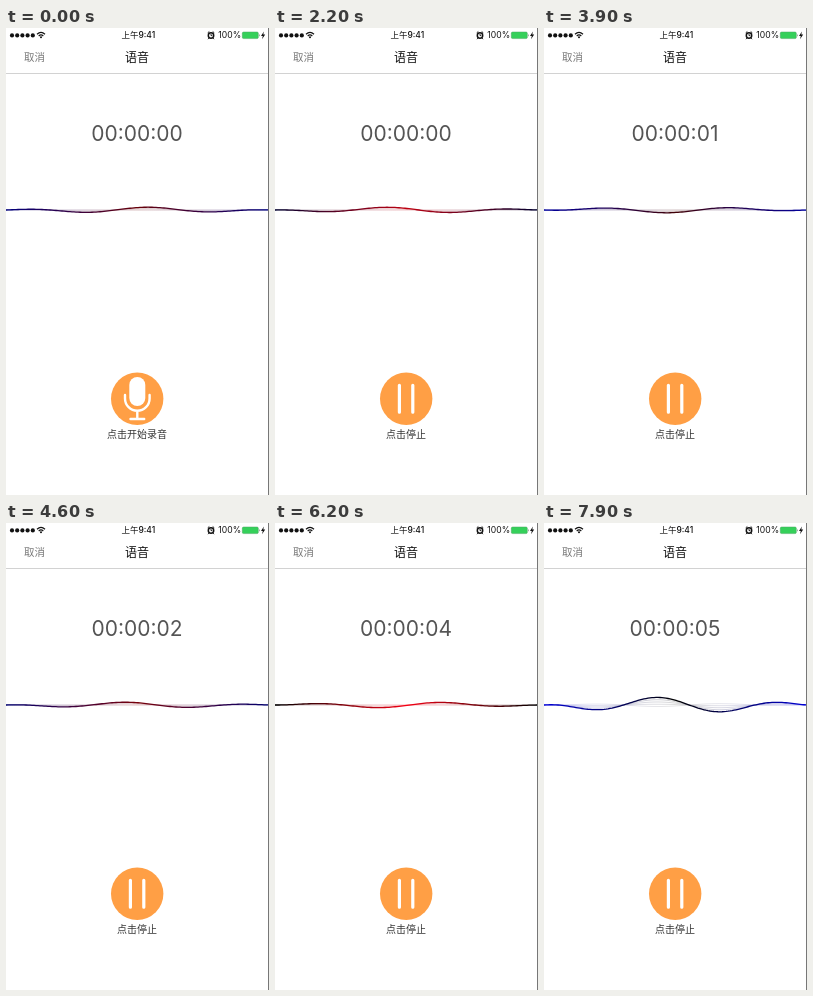
These frames come from a looping animation (263x467 px, 8000 ms). An HTML page:

```html
<!DOCTYPE html>
<html lang="zh">
<head>
<meta charset="utf-8">
<style>
  html, body { margin: 0; width: 100%; height: 100%; overflow: hidden; background: #fff; }
  svg { display: block; width: 100%; height: 100%; }
  text { font-family: Inter, "Noto Sans CJK SC", "Noto Sans CJK", sans-serif; }
  .mid { text-anchor: middle; }
  .line { fill: none; stroke: #fff; stroke-linecap: round; }
</style>
</head>
<body>
<svg viewBox="0 0 263 467">
  <defs>
    <linearGradient id="tint" gradientUnits="userSpaceOnUse" x1="0" y1="0" x2="263" y2="0">
      <stop class="edge" offset="0"/>
      <stop class="core" offset=".5"/>
      <stop class="edge" offset="1"/>
    </linearGradient>
  </defs>
  <rect width="263" height="467" fill="#fff"/>

  <g id="status" fill="#111">
    <g id="signal"></g>
    <g fill="none" stroke="#111" stroke-width="1.2">
      <path d="M31 6.2Q35 2.6 39 6.2M32.7 8Q35 5.9 37.3 8"/>
    </g>
    <circle cx="35" cy="9.3" r="1"/>
    <text class="mid" x="132.3" y="10.4" font-size="8.5" font-weight="500">上午9:41</text>
    <circle cx="205" cy="7.5" r="2.7" fill="#fff" stroke="#111" stroke-width="1.5"/>
    <path d="M205 5.8V7.6H206.3M201.7 4.8L203.3 3.5M208.3 4.8L206.7 3.5M203 10L202 11.2M207 10L208 11.2" fill="none" stroke="#111" stroke-width=".9"/>
    <text x="212.3" y="10.4" font-size="8.6">100%</text>
    <rect x="236.3" y="4" width="16" height="6.6" rx="1.3" fill="#35d05a" stroke="#4aa561" stroke-width=".5"/>
    <path d="M253 6V8.7Q254.3 7.4 253 6Z" fill="#555"/>
    <path d="M257.9 3.4L255 7.9H256.8L256 11.3L259.2 6.6H257.3Z"/>
  </g>

  <text x="18" y="33.4" font-size="10.5" fill="#777">取消</text>
  <text class="mid" x="131" y="34.2" font-size="12" font-weight="500" fill="#111">语音</text>
  <path d="M0 45.5H263" stroke="#d2d2d2"/>

  <text id="timer" class="mid" x="131" y="112.6" font-size="21" fill="#555"></text>
  <g id="waves" fill="none" stroke="url(#tint)"></g>

  <circle cx="131.2" cy="370.7" r="26.2" fill="#ff9f45"/>
  <g id="mic">
    <rect x="123.3" y="349" width="16" height="29" rx="8" fill="#fff"/>
    <path class="line" stroke-width="2.4" d="M119 367V370.5A12.3 12.3 0 0 0 143.6 370.5V367M131.3 383V391M124.5 391H138.2"/>
  </g>
  <path id="pause" class="line" stroke-width="3.2" d="M124.4 357.3V384.2M137.8 357.3V384.2"/>
  <text id="hint" class="mid" x="131" y="410.4" font-size="10" fill="#333"></text>
  <path d="M262.5 0V467" stroke="#777"/>
</svg>
<script>
const WIDTH = 263, MID = WIDTH / 2, AXIS = 182;
const LOOP = 8, TAP = 2, WAVES = 5;
const SPEED = 2.107; // wave cycles per second
const TINT = [[0, .42], [1.5, 1], [3.85, .25], [6.2, 1], [7.9, 0]];
const LEVEL = [[0, 2.8], [7.2, 2.8], [7.5, 49], [7.9, 7.7]];

const $ = id => document.getElementById(id);
const add = (parent, tag, attrs) => {
  const el = document.createElementNS("http://www.w3.org/2000/svg", tag);
  for (const name in attrs) el.setAttribute(name, attrs[name]);
  return parent.appendChild(el);
};

for (let i = 0; i < 5; i++) add($("signal"), "circle", { cx: 6 + i * 5.2, cy: 7.4, r: 2.1 });

const waves = Array.from({ length: WAVES }, (_, i) => {
  const progress = 1 - i / WAVES;
  const path = add($("waves"), "path", {
    "stroke-width": i ? .6 : 1.3,
    "stroke-opacity": i ? .35 * (progress * 2 / 3 + 1 / 3) : 1
  });
  return { path, scale: 1.5 * progress - .5 };
});

function sample(keys, t) {
  const next = keys.findIndex(([time]) => time > t);
  if (next < 0) return keys[keys.length - 1][1];
  const [t0, v0] = keys[next - 1], [t1, v1] = keys[next];
  return v0 + (v1 - v0) * (t - t0) / (t1 - t0);
}

function wavePath(amplitude, cycles) {
  let d = "";
  for (let x = 0; x <= WIDTH; x += 2) {
    const u = (x - MID) / MID;
    const y = AXIS - amplitude * (1 - u * u) * Math.cos(2 * Math.PI * (u - cycles));
    d += (x ? "L" : "M") + x + " " + y.toFixed(2);
  }
  return d;
}

function render(t) {
  const recording = t >= TAP;
  const seconds = recording ? Math.floor(t - TAP + 1e-6) : 0;
  $("timer").textContent = "00:00:0" + seconds;
  $("hint").textContent = recording ? "点击停止" : "点击开始录音";
  $("mic").style.display = recording ? "none" : "";
  $("pause").style.display = recording ? "" : "none";

  const tint = sample(TINT, t);
  const paint = (selector, color) =>
    document.querySelectorAll(selector).forEach(stop => stop.setAttribute("stop-color", color));
  paint(".edge", `rgb(0,0,${Math.round(215 * (1 - tint))})`);
  paint(".core", `rgb(${Math.round(245 * tint)},0,${Math.round(20 * tint)})`);

  const level = sample(LEVEL, t);
  const cycles = .084 + SPEED * t + (recording ? .125 : 0);
  for (const { path, scale } of waves) path.setAttribute("d", wavePath(level * scale, cycles));
}

const start = performance.now();
function tick() {
  // The picture advances ten times a second.
  const step = Math.floor((performance.now() - start) / 100);
  render(step % (LOOP * 10) / 10);
  requestAnimationFrame(tick);
}
tick();
</script>
</body>
</html>
```
